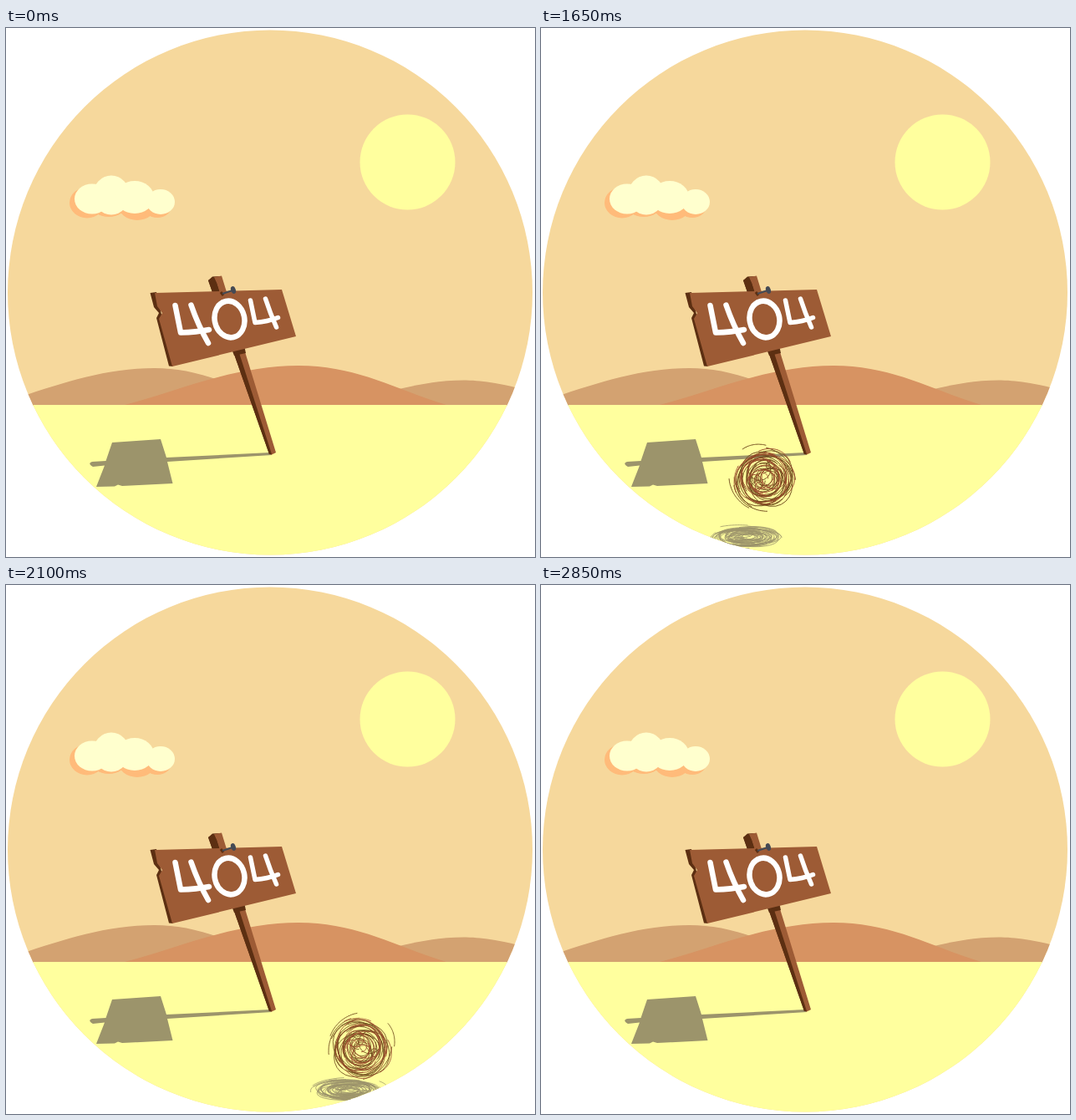
An HTML page that plays this animation: 633x633 px, repeating every 3000 ms.

```html
<!DOCTYPE html>
<html lang="en">
<head>
<meta charset="utf-8">
<title>404 desert</title>
<style>
html, body { margin: 0; height: 100%; overflow: hidden; background: #fff; }
svg { display: block; width: 100%; height: 100%; }
.line path { fill: none; vector-effect: non-scaling-stroke; }
</style>
</head>
<body>
<svg viewBox="0 0 633 633">
  <defs>
    <clipPath id="disc"><circle cx="316" cy="316.5" r="314"/></clipPath>
  </defs>
  <g clip-path="url(#disc)">
    <path fill="#f6d89c" d="M0 0H633V633H0z"/>
    <circle cx="480.5" cy="160.5" r="57" fill="#ffff9e"/>

    <g fill="#ffbb7a">
      <ellipse cx="97" cy="209" rx="21" ry="18.5"/>
      <ellipse cx="123" cy="210" rx="22" ry="16"/>
      <ellipse cx="157" cy="211" rx="23" ry="19"/>
      <ellipse cx="181" cy="213" rx="17" ry="14"/>
    </g>
    <g fill="#ffffce">
      <ellipse cx="103" cy="204.5" rx="21" ry="18"/>
      <ellipse cx="126" cy="200" rx="22" ry="23.5"/>
      <ellipse cx="154" cy="202.5" rx="23" ry="19.5"/>
      <ellipse cx="185" cy="208" rx="17" ry="15"/>
    </g>

    <path fill="#d3a271" d="M15 442C70 424 120 407 178 407C215 407 250 417 300 440V452H15z"/>
    <path fill="#d3a271" d="M440 440C475 430 510 421.5 547 421.5C570 421.5 590 425 640 437V452H440z"/>
    <path fill="#d79362" d="M142 451C195 438 270 404 350 404C420 404 465 432 527 451z"/>
    <path fill="#ffff9e" d="M0 451H633V633H0z"/>

    <path fill="#9c946b" d="M127 496L185 492L192 514L316 508L318 511L193 519L199.5 545L139 548L134 546.5L130 548.5L108 549L118 523.5L104 525Q97 521 103 519L119.5 518z"/>

    <path fill="#5c2f12" d="M242 302L247 297.5L257 297L322 508L315 510z"/>
    <path fill="#9d5b35" d="M249 298L258 296.5L323 508L317 511L252 305z"/>
    <path fill="#5c2f12" d="M242 302L248 298L252 305L318 510L315 510z"/>
    <path fill="#5c2f12" d="M270 384L285 380L287 389L273 392z"/>
    <path fill="#5c2f12" d="M172.5 317L180 316L200 405L195 404.5L180 347L183 341L177 334z"/>
    <path fill="#9d5b35" d="M178 317L330 313L347 369L199 405L183 348L187 341L181 333z"/>

    <g fill="none" stroke="#fff" stroke-width="6.5" stroke-linecap="round" stroke-linejoin="round" role="img" aria-label="404">
      <path d="M202.5 332L209 364.5Q228 364 243 361M221.5 331.5Q230 356 242 377"/>
      <ellipse cx="267.5" cy="348.5" rx="17.8" ry="22" transform="rotate(-12 267.5 348.5)"/>
      <path stroke-width="5.5" d="M292.5 326L298 352.5Q313 351.500 325.500 346.500M310.500 324Q316 341 323.500 358"/>
    </g>

    <path stroke="#5c2f12" stroke-width="3" d="M257 316L260 320"/>
    <path stroke="#454a54" stroke-width="2" d="M259 318L271 314"/>
    <ellipse cx="272" cy="313.5" rx="2.8" ry="4.5" fill="#454a54" transform="rotate(-20 272 313.5)"/>

    <g id="weed" class="line" display="none">
      <g id="shade" stroke="#9c946b" stroke-width=".8"><path class="a"/><path class="b"/></g>
      <g id="ball" stroke-width=".85"><path class="a" stroke="#704a1c"/><path class="b" stroke="#9a4a2c"/></g>
    </g>
  </g>
</svg>
<script>
const $ = s => document.querySelector(s);
const LOOP = 3000, STEP = 150, START = 7;
// Bouncing path, one x,y pair per step
const path = [
  [83, 555], [148, 561], [177, 569], [226, 556], [268, 539], [323, 525],
  [365, 540], [425, 555], [443, 567], [482, 560], [509, 552], [569, 541]
];

let seed = 29;
const rnd = () => (seed = seed * 16807 % 2147483647) / 2147483647;

// Elliptic arc of radius r, pushed off centre by up to `off`
function arc(r, off, sweep) {
  const start = rnd() * 7, dir = rnd() * 7, tilt = rnd() * 3;
  const cx = off * Math.cos(dir), cy = off * Math.sin(dir);
  const ry = r * (.78 + rnd() * .22);
  let d = "";
  for (let i = 0; i <= 24; i++) {
    const t = start + sweep * i / 24, u = r * Math.cos(t), v = ry * Math.sin(t);
    const x = cx + u * Math.cos(tilt) - v * Math.sin(tilt);
    const y = cy + u * Math.sin(tilt) + v * Math.cos(tilt);
    d += (i ? "L" : "M") + x.toFixed(1) + " " + y.toFixed(1);
  }
  return d;
}

function scribble(n, strays) {
  let d = "";
  for (let i = 0; i < n; i++) {
    const r = 5 + 32 * (i + rnd()) / n;
    d += arc(r, (39 - r) * .6 * rnd(), 3.5 + rnd() * 2.8);
  }
  for (let i = 0; i < strays; i++) d += arc(40 + rnd() * 3, 3, .8 + rnd() * .6);
  return d;
}

for (const [name, d] of [["a", scribble(26, 5)], ["b", scribble(15, 2)]])
  document.querySelectorAll("." + name).forEach(p => p.setAttribute("d", d));

function draw(now) {
  const k = Math.floor(now % LOOP / STEP) - START, p = path[k];
  $("#weed").setAttribute("display", p ? "inline" : "none");
  if (p) {
    const [x, y] = p, turn = `rotate(${k * 28})`;
    const sx = x - 31 + 2.25 * k, sy = 615 - 1.5 * k;
    $("#ball").setAttribute("transform", `translate(${x} ${y}) ${turn}`);
    $("#shade").setAttribute("transform", `translate(${sx} ${sy}) scale(1.16 .35) ${turn}`);
  }
}

const t0 = performance.now();
function tick(now) {
  draw(Math.max(0, now - t0));
  requestAnimationFrame(tick);
}
requestAnimationFrame(tick);
</script>
</body>
</html>
```
